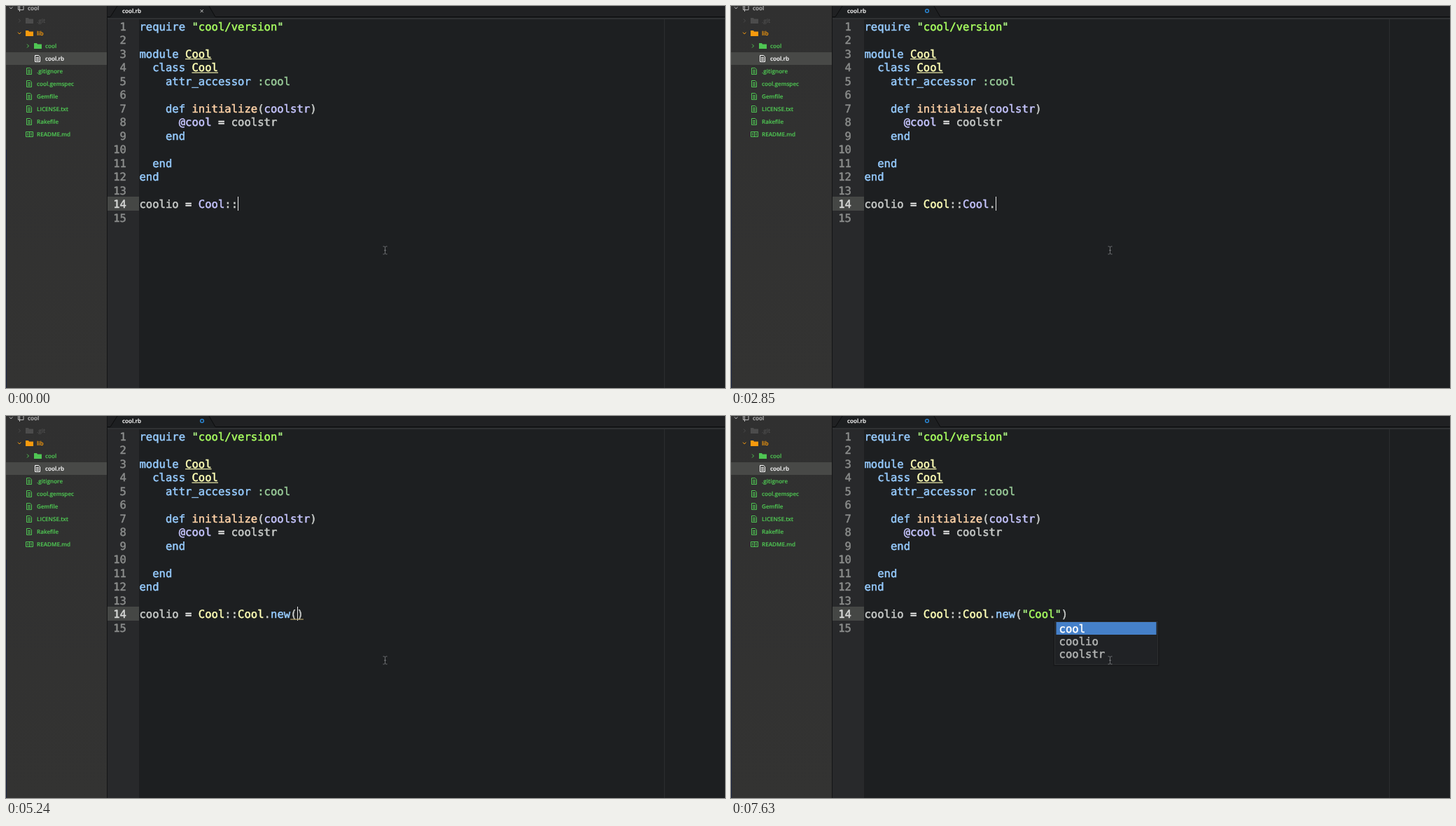
Write an HTML page that moves like this. It is 1027 by 545 pixels and loops after 8000 ms.

```html
<!DOCTYPE html>
<html lang="en">
<head>
<meta charset="utf-8">
<title>Code completion</title>
<style>
html, body { margin: 0; height: 100%; overflow: hidden; background: #1d1f21; }
svg { display: block; }
text { white-space: pre; text-rendering: geometricPrecision; color: #c9ccca; fill: currentColor; }
.code { font: 15.58px "DejaVu Sans Mono", monospace; stroke: currentColor; stroke-width: .5; }
.num { text-anchor: end; color: #8a8c8b; }
.hint { font: bold 13.2px "DejaVu Sans Mono", monospace; text-anchor: end; color: #595b5d; }
.side { font: 600 8.15px "Open Sans", sans-serif; stroke: currentColor; stroke-width: .15; }
.k { color: #96cbfe; } .s { color: #a8ff60; } .q { color: #a8ee80; }
.c { color: #ffffb6; } .f { color: #ffd2a7; } .v { color: #c6c5fe; }
.y { color: #99cc99; } .w { color: #ededed; } .g { color: #c9ccca; }
</style>
</head>
<body>
<svg width="1027" height="545" viewBox="0 0 1027 545">
  <defs>
    <linearGradient id="panel" x2="0" y2="1">
      <stop stop-color="#303030"/><stop offset="1" stop-color="#333332"/>
    </linearGradient>
  </defs>
  <g id="scene"></g><g id="live"></g>
  <path d="M538.5 343h2l1 1 1-1h2M541.5 344v9M538.5 354h2l1-1 1 1h2M540 348.5h3" fill="none" stroke="#6e7073"/>
</svg>
<script>
const LEFT = 190.4, CHAR = 9.38, LINE = 19.5, LOOP = 8000;
const GREEN = '#4fc553', ORANGE = '#f79a0d';
const col = n => LEFT + n * CHAR;
const base = n => 34.5 + (n - 1) * LINE;
const rect = (x, y, w, h, fill, more = '') =>
  `<rect x="${x}" y="${y}" width="${w}" height="${h}" fill="${fill}" ${more}/>`;
const path = (d, stroke, fill = 'none') => `<path d="${d}" stroke="${stroke}" fill="${fill}"/>`;
const text = (x, y, cls, s, color) =>
  `<text x="${x}" y="${y}" class="${cls}"${color ? ` style="color:${color}"` : ''}>${s}</text>`;
// "[k]" switches the colour class for the text after it
const paint = s => s.replace(/\[(\w)\]([^[]*)/g, '<tspan class="$1">$2</tspan>');
const underline = (n, from, len, fill) => rect(col(from), base(n) + 1.5, len * CHAR, 1.2, fill);

const lines = [
  '[k]require [q]"[s]cool/version[q]"', '',
  '[k]module [c]Cool', '[k]  class [c]Cool', '[k]    attr_accessor [y]:cool', '',
  '[k]    def [f]initialize[g]([v]coolstr[g])', '[v]      @cool [w]= [g]coolstr',
  '[k]    end', '', '[k]  end', '[k]end', '', '', ''
];

const icons = {
  folder: (x, y, c) => path(`M${x} ${y - 4}h4l1 1.5h6v6.5h-11z`, 'none', c),
  file: (x, y, c) => path(`M${x + 1.5} ${y - 4.5}h5l2 2v7h-7zM${x + 3} ${y - 1.5}h4M${x + 3} ${y + .5}h4M${x + 3} ${y + 2.5}h4`, c),
  book: (x, y, c) => path(`M${x + .5} ${y - 3.5}h10v7h-10zM${x + 5.5} ${y - 3.5}v7M${x + 2} ${y - 1}h2M${x + 2} ${y + 1}h2M${x + 7} ${y - 1}h2M${x + 7} ${y + 1}h2`, c),
  repo: (x, y, c) => path(`M${x + 1.5} ${y - 4}v6.5h7.5v-6.5M${x + 3.5} ${y - 4}v6.5M${x + 3.5} ${y + 2.5}v2.5`, c)
};
const tree = [
  ['repo', 16, 31, 'cool', '#b9b9b9', 'open'], ['folder', 28, 44, '.git', '#4c4c4c', 'shut'],
  ['folder', 28, 44, 'lib', ORANGE, 'open'], ['folder', 40, 56, 'cool', GREEN, 'shut'],
  ['file', 40, 56, 'cool.rb', '#fff'], ['file', 28, 44, '.gitignore', GREEN],
  ['file', 28, 44, 'cool.gemspec', GREEN], ['file', 28, 44, 'Gemfile', GREEN],
  ['file', 28, 44, 'LICENSE.txt', GREEN], ['file', 28, 44, 'Rakefile', GREEN],
  ['book', 28, 44, 'README.md', GREEN]
];

function sidebar() {
  const rows = tree.map(([icon, ix, tx, name, color, fold], i) => {
    const y = 3 + i * 18, ax = ix - 9;
    const arrow = fold == 'open' ? `M${ax - 2} ${y - 1.5}l2.2 2.5 2.2-2.5` : `M${ax - 1} ${y - 2.5}l2.5 2.5-2.5 2.5`;
    return icons[icon](ix, y, color) + (fold ? path(arrow, color) : '') + text(tx, y + 3, 'side', name, color);
  });
  return rect(0, 0, 144, 545, 'url(#panel)') + rect(0, 66, 144, 18, '#484947') +
    rect(0, 205, 1, 340, '#1a2340') + rect(144, 0, 1, 545, '#141516') + rows.join('');
}

function editor() {
  const code = lines.map((s, i) =>
    text(172, base(i + 1), 'code num', i + 1, i == 13 ? '#d5d7d5' : '') +
    text(LEFT, base(i + 1), 'code', paint(s)));
  return rect(145, 0, 882, 545, '#1d1f21') + rect(145, 19, 45, 526, '#28292b') +
    rect(940, 19, 1, 526, '#2c2e30') + rect(145, 272, 45, 20, '#454745') +
    rect(145, 0, 882, 16, '#202123') + path('M149 16L159 0H290L299 16z', 'none', '#1d1f21') +
    path('M145 15.5H149L159 0M290 0L299 15.5H1027', '#0b0c0d') + rect(145, 17, 882, 2, '#2f3133') +
    text(166, 9.5, 'side', 'cool.rb', '#fff') + code.join('') +
    underline(3, 7, 4, '#f0f0ab') + underline(4, 8, 4, '#f0f0ab');
}

const C = 'CLASS', M = 'METHOD';
const constItems = [
  ['Cool', 'Cool::Cool', C], ['class', 'Object#class', M], ['clone', 'Object#clone', M],
  ['constants', 'Module#constants', M], ['const_get', 'Module#const_get', M],
  ['const_set', 'Module#const_set', M], ['class_eval', 'Module#class_eval', M]
];
const newItems = [
  ['name', 'Module#name', M], ['clone', 'Object#clone', M], ['Kernel', 'Object::Kernel', 'MODULE'],
  ['Numeric', 'Object::Numeric', C], ['method_defined', 'Module#method_defined', M],
  ['NameError', 'Object::NameError', C], ['public_method_defined?', 'Module#public_method_defined?', M]
];
const words = [['cool'], ['coolio'], ['coolstr']];

function popup(column, width, items) {
  const x = Math.round(col(column)) + .5, hinted = items[0].length > 1;
  const step = hinted ? 20.7 : 18, h = hinted ? 151 : 61;
  return rect(x - 2, 292, width + 4, h + 4, '#000', 'opacity=".18"') +
    rect(x, 293.5, width, h, '#202225', 'stroke="#2c2e30"') +
    rect(x + 2, 294, width - 4, hinted ? 21 : 18, '#4580c9') +
    items.map(([label, owner, kind], i) => {
      const y = 308.5 + i * step;
      return text(x + 6, y, 'code', label, i ? '#b2b4b3' : '#fff') +
        (owner ? text(x + width - 9, y + 1.7, 'hint', `${owner} ${kind}`, i ? '' : '#7299cc') : '');
    }).join('');
}

const head = '[g]coolio [w]= ';
const scoped = head + '[c]Cool[g]::';
const called = scoped + '[c]Cool[g].';
const made = called + '[k]new';
const quoted = s => `${made}[g]([q]"[s]${s}[q]"[g])`;
const constPopup = popup(16, 606, constItems), stringPopup = popup(26, 306, constItems);
const brackets = underline(14, 23, 2, '#b5a268');

// start time, line 14, caret column (-1 when hidden), overlay
const steps = [
  [0, head + '[v]Cool[g]::', 15],
  [300, scoped + '[v]C', 16],
  [450, scoped + '[v]C', -1, constPopup],
  [1800, scoped + '[v]Cool', 19],
  [2250, scoped + '[v]Cool', -1],
  [2700, scoped + '[v]Cool', 19],
  [2850, scoped + '[v]Cool[g].', 20],
  [3300, called + 'n', 21],
  [3450, called + 'n', -1, popup(21, 646, newItems)],
  [3600, called + 'ne', 22],
  [3890, called + 'ne', -1, popup(22, 646, newItems)],
  [4040, made, -1, popup(22, 646, newItems)],
  [4190, made, 23],
  [4490, made, -1],
  [4790, made, 23],
  [5240, made + '[g]()', 24, brackets],
  [5690, made + '[g]()', -1, brackets],
  [5840, quoted(''), 25],
  [6290, quoted(''), -1],
  [6590, quoted(''), 25],
  [6740, quoted('C'), 26],
  [6880, quoted('C'), -1, stringPopup],
  [7030, quoted('Co'), -1, stringPopup],
  [7180, quoted('Coo'), -1, stringPopup],
  [7330, quoted('Cool'), -1, stringPopup],
  [7480, quoted('Cool'), 29],
  [7630, quoted('Cool'), -1, popup(29, 147, words)]
];

const tabMark = edited => edited
  ? '<circle cx="280" cy="7" r="2.4" fill="none" stroke="#2b8fe3" stroke-width="1.3"/>'
  : path('M277.7 5.2l4 4M281.7 5.2l-4 4', '#c8c8c8');

const scene = document.getElementById('scene'), live = document.getElementById('live');
scene.innerHTML = sidebar() + editor();

const start = performance.now();
let shown;
function frame() {
  const t = (performance.now() - start) % LOOP;
  const now = steps.findLast(s => s[0] <= t);
  if (now != shown) {
    shown = now;
    const [time, code, caret, overlay = ''] = now;
    live.innerHTML = tabMark(time > 0) + text(LEFT, base(14), 'code', paint(code)) +
      (caret < 0 ? '' : rect(Math.round(col(caret)), 272, 1, 20, '#e8e8e8')) + overlay;
  }
  requestAnimationFrame(frame);
}
frame();
</script>
</body>
</html>
```
